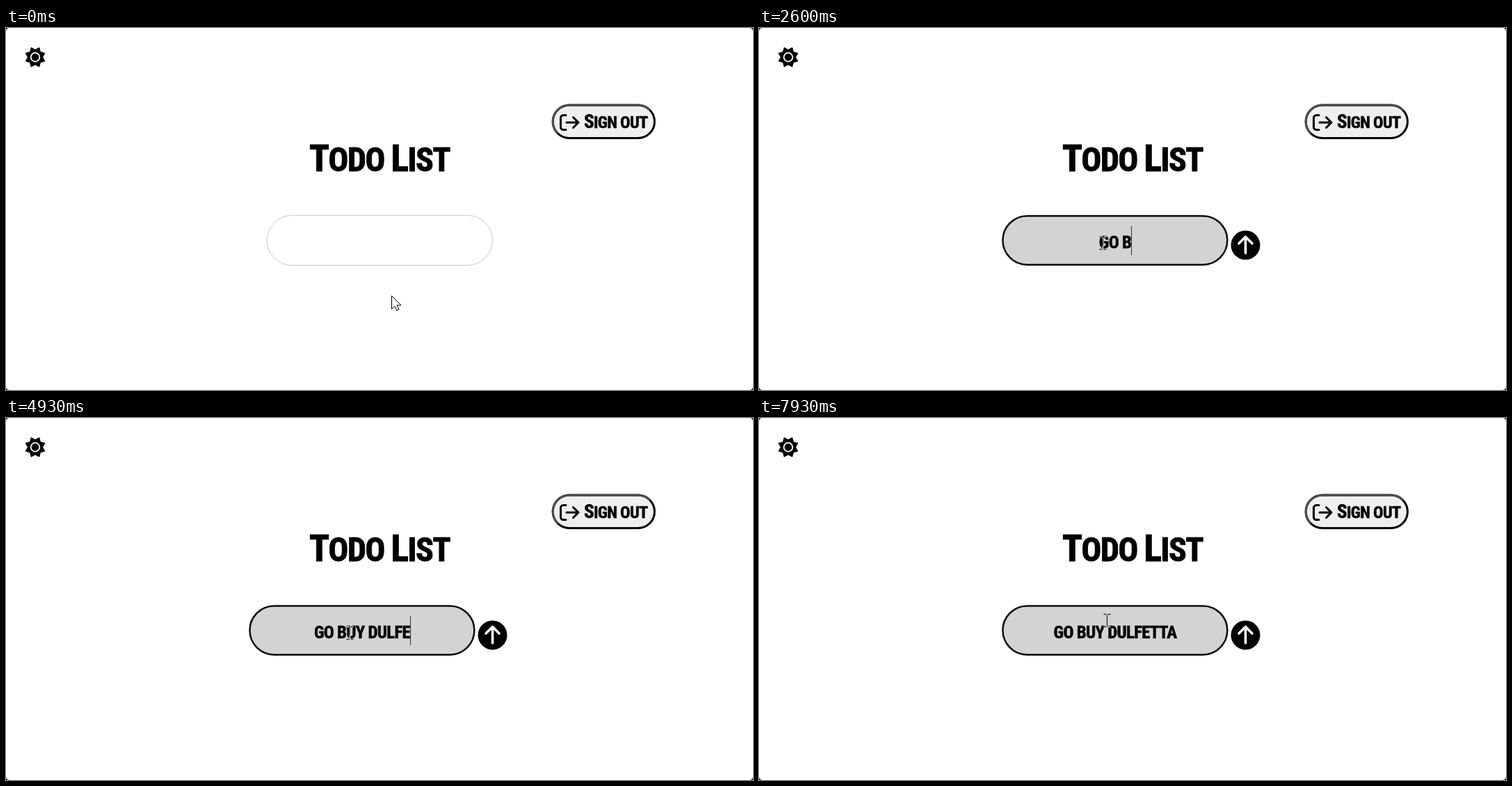
Write an HTML page that moves like this. It is 1074 px wide and 521 px high and loops after 8 s.

```html
<!DOCTYPE html>
<html lang="en">
<head>
<meta charset="utf-8">
<title>Todo List</title>
<style>
  html, body { margin: 0; width: 100%; height: 100%; overflow: hidden; background: #333; }
  svg { display: block; width: 1074px; height: 521px; }
  text {
    font-size: 20px; font-weight: 900; font-stretch: 62.5%; letter-spacing: -.03em;
    white-space: pre; stroke: #000; stroke-width: .02em;
  }
  .cap { font-size: 1.12em; }
  .line { fill: none; stroke: #000; stroke-width: 3; stroke-linecap: round; stroke-linejoin: round; }
  #beam { fill: none; stroke: #fff; stroke-width: 1.3; mix-blend-mode: difference; }
</style>
</head>
<body>
<svg viewBox="0 0 1074 521">
  <rect width="1074" height="521" rx="5" fill="#fff"/>

  <g transform="translate(42 42)">
    <polygon id="sun" stroke="#000" stroke-width="1.4" stroke-linejoin="round"/>
    <circle r="6.3" stroke="#fff" stroke-width="1.8"/>
  </g>

  <rect x="786.2" y="111" width="146.3" height="47.5" rx="23.75" fill="#efefef" stroke="#000" stroke-width="3"/>
  <path d="M793.2 151.6A23.75 23.75 0 0 1 810 111H908.8A23.75 23.75 0 0 1 925.6 118" fill="none" stroke="#4c4c4c" stroke-width="3"/>
  <path class="line" d="M805 125.5H801.5a4 4 0 0 0-4 4V142.500a4 4 0 0 0 4 4H805M806 136H822.500M815.500 128.500l7.500 7.500-7.500 7.500"/>
  <text id="signOut"><tspan class="cap">S</tspan>IGN OUT</text>
  <text id="heading"><tspan class="cap">T</tspan>ODO <tspan class="cap">L</tspan>IST</text>

  <rect id="field"/>
  <text id="entry"></text>
  <rect id="caret" y="285" width="1" height="42" fill="#333"/>
  <g id="send" transform="translate(699.5 312.500)">
    <circle r="21"/>
    <path class="line" style="stroke:#fff;stroke-width:3.6" d="M0 11.500V-11.500M-9.500-2.500L0-12 9.500-2.500"/>
  </g>

  <path id="arrow" d="M.5.5V19.500L4.800 15.300 7.800 21.500 11 20 8 14H14Z" fill="#fff" stroke="#000"/>
  <path id="beam" d="M-5-9h4M1-9h4M0-8V8M-5 9h4M1 9h4"/>
</svg>
<script>
const LOOP = 8000, FOCUS = 530, BLINK = 535, MID = 512;
const $ = id => document.getElementById(id);
const set = (el, attrs) => { for (const k in attrs) el.setAttribute(k, attrs[k]); };
const show = (el, on) => set(el, { visibility: on ? 'visible' : 'hidden' });
const [sun, field, entry, caret, send, arrow, beam, heading, signOut] =
  ['sun', 'field', 'entry', 'caret', 'send', 'arrow', 'beam', 'heading', 'signOut'].map($);

const keys = [
  [1730, 'G'], [1800, 'G'], [2330, 'GO'], [2400, 'GO '], [2600, 'GO B'], [2730, 'GO BU'],
  [3000, 'GO BUY'], [3330, 'GO BUY '], [3470, 'GO BUY D'], [3730, 'GO BUY DU'],
  [3930, 'GO BUY DUK'], [4530, 'GO BUY DU'], [4670, 'GO BUY DUL'], [4800, 'GO BUY DULF'],
  [4930, 'GO BUY DULFE'], [6730, 'GO BUY DULFET'], [6870, 'GO BUY DULFETT'], [7000, 'GO BUY DULFETTA']
];
const moves = [70, 130, 200, 270, 330, 400, 470];

// Use the narrowest heavy face available.
const widthIn = family => {
  heading.style.fontFamily = family;
  return heading.getComputedTextLength();
};
const face = ['Anton', 'Roboto Condensed', 'Roboto', 'Open Sans', 'Noto Sans']
  .map(name => `"${name}", Roboto, sans-serif`)
  .sort((a, b) => widthIn(a) - widthIn(b))[0];

// Choose the font size for a line length and centre its capitals on mid.
function fit(el, x, mid, width) {
  el.style.fontFamily = face;
  const size = 20 * width / el.getComputedTextLength();
  el.style.fontSize = size + 'px';
  set(el, { x, y: mid + .357 * size });
}
fit(heading, 436, 189, 202);
fit(signOut, 831, 135, 91.5);
entry.textContent = keys[keys.length - 1][1];
fit(entry, MID, 308, 177);

set(sun, {
  points: Array.from({ length: 16 }, (_, i) => {
    const r = i % 2 ? 14.6 : 10.3, a = i * Math.PI / 8;
    return [r * Math.cos(a), r * Math.sin(a)];
  }).join(' ')
});

function pointer(t) {
  const p = moves.filter(m => t >= m).length / moves.length;
  const e = p * p * (3 - 2 * p);
  const lift = t >= 7930 ? 1 : t >= 7870 ? .5 : 0;
  return [554 - 59.5 * e + 6 * lift, 385 - 75.5 * e - 18 * lift];
}

function draw(t) {
  const focused = t >= FOCUS;
  const [typedAt, text] = keys.filter(k => t >= k[0]).pop() || [FOCUS, ''];
  const weight = focused ? 2.5 : 1;

  set(field, {
    x: (text ? 349.2 : 374.6) + weight / 2, y: 269.2 + weight / 2,
    width: 325.4 - weight, height: 72.8 - weight, rx: 36.4 - weight / 2,
    fill: focused ? '#d3d3d3' : '#fff', stroke: focused ? '#0a0a0a' : '#c8c8c8', 'stroke-width': weight
  });
  show(send, text);

  if (entry.textContent !== text) entry.textContent = text;
  const width = text ? entry.getComputedTextLength() : 0;
  set(entry, { x: MID - width / 2 });
  set(caret, { x: text ? Math.round(MID + width / 2) : 537 });
  show(caret, focused && Math.floor((t - typedAt) / BLINK) % 2 === 0);

  const [x, y] = pointer(t), inside = y < 342;
  show(arrow, !inside);
  show(beam, inside);
  set(inside ? beam : arrow, { transform: `translate(${x} ${y})` });
}

const start = performance.now();
function frame() {
  draw((performance.now() - start) % LOOP);
  requestAnimationFrame(frame);
}
frame();
</script>
</body>
</html>
```
